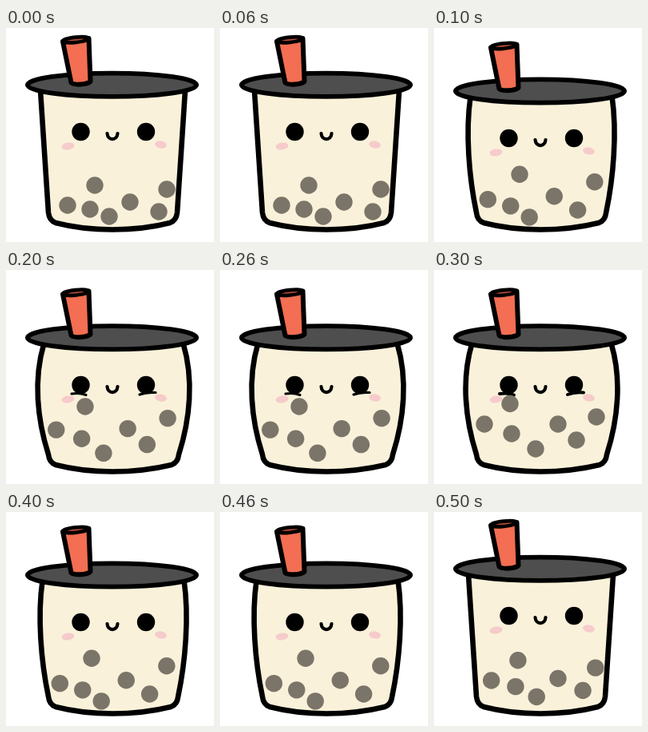
Write an HTML page that moves like this. It is 260 px wide and 268 px high and loops after 600 ms.

```html
<!DOCTYPE html>
<html lang="en">
<head>
<meta charset="utf-8">
<title>Bouncing bubble tea</title>
<style>
  html, body { margin: 0; width: 100%; height: 100%; overflow: hidden; background: #fff; }
  svg { display: block; width: 100vw; height: 100vh; }
  .ink { stroke: #000; stroke-linecap: round; stroke-linejoin: round; }
  .line { fill: none; }
</style>
</head>
<body>
<svg viewBox="0 0 260 268">
  <path id="cup" class="ink" fill="#faf1da" stroke-width="6.6"/>
  <g id="face">
    <ellipse cx="77.5" cy="148" rx="8" ry="4.5" fill="#f6cbcb" transform="rotate(-8 77.5 148)"/>
    <ellipse cx="193.5" cy="146" rx="7.5" ry="4.5" fill="#f6cbcb" transform="rotate(10 193.5 146)"/>
    <circle cx="93.5" cy="130" r="11.2"/>
    <circle cx="175" cy="130" r="11.2"/>
    <path class="ink line" d="M126.5 132C127 141.500 139 141.500 139.5 132" stroke-width="4.2"/>
    <path id="squint" class="ink line" d="M82 141Q92 139.500 100 142.500M167 142Q176 138.500 187 139.500"/>
  </g>
  <g id="pearls" fill="#7b7569"></g>
  <g id="lid">
    <ellipse class="ink" cx="132.5" cy="71.3" rx="105.6" ry="14.6" fill="#4e4e4e" stroke-width="5.8"/>
    <path class="ink" d="M71 17L81.500 68.500C86 72 101 71 105.500 67L103.500 13Z" fill="#f36e52" stroke-width="6"/>
    <ellipse class="ink" cx="87.2" cy="14.8" rx="16.2" ry="3.2" fill="#bd4f39" stroke-width="4.6" transform="rotate(-6 87.2 14.8)"/>
  </g>
</svg>
<script>
const $ = id => document.getElementById(id);
const STEP = 100, BEATS = 6;

// Height of the pearls at each beat, and how far the deep ones trail behind
const lift = [0, 0.28, 0.77, 1, 0.28, 0.38];
const lag = [0, 1, 0.6, 0, 1, 0];

// Each pearl: resting place and highest place
const pearls = [
  [111, 197, 95, 167.5], [77, 222, 63, 193], [105, 227, 97, 205], [129, 236, 127, 224],
  [155, 218, 155, 193], [201, 202, 203, 184], [191, 230, 178, 213]
];

const dots = pearls.map(() => {
  const dot = document.createElementNS('http://www.w3.org/2000/svg', 'circle');
  dot.setAttribute('r', 10.7);
  return $('pearls').appendChild(dot);
});

function set(el, attrs) {
  for (const key in attrs) el.setAttribute(key, attrs[key]);
}

const lerp = (a, b, t) => a + (b - a) * t;

// The squashed cup is shorter and its mirrored sides bulge out
function cupPath(squash) {
  const mirror = x => 267 + 2 * squash - x;
  const top = 78 + 14 * squash;
  const rim = 43 + 4.5 * squash;
  const upper = 46 - 12 * squash;
  const lower = 50 - 11 * squash;
  return `M${rim} ${top} C${upper} ${top + 45} ${lower} 187 53 231
    Q54 241 62 244 Q95 252.500 133 252.500 Q172 252.500 ${mirror(62)} 244
    Q${mirror(54)} 241 ${mirror(53)} 231
    C${mirror(lower)} 187 ${mirror(upper)} ${top + 45} ${mirror(rim)} ${top}Z`;
}

function draw(beat) {
  const squash = Math.min(1, 0.57 * Math.min(beat, BEATS - 1 - beat));
  set($('cup'), { d: cupPath(squash) });
  set($('face'), { transform: `translate(0 ${14 * squash})` });
  set($('lid'), { transform: `translate(0 ${13.5 * squash})` });
  set($('squint'), {
    display: squash === 1 ? 'inline' : 'none',
    'stroke-width': lerp(0.5, 4, lift[beat])
  });
  pearls.forEach(([x, y, peakX, peakY], i) => {
    const depth = (y - 219) / 4;
    set(dots[i], {
      cx: lerp(x, peakX, lift[beat]) - (5 + depth) * lag[beat],
      cy: lerp(y, peakY, lift[beat]) + depth * lag[beat]
    });
  });
}

const start = performance.now();
function tick() {
  const time = Math.max(0, performance.now() - start);
  draw(Math.floor(time / STEP) % BEATS);
  requestAnimationFrame(tick);
}
tick();
</script>
</body>
</html>
```
